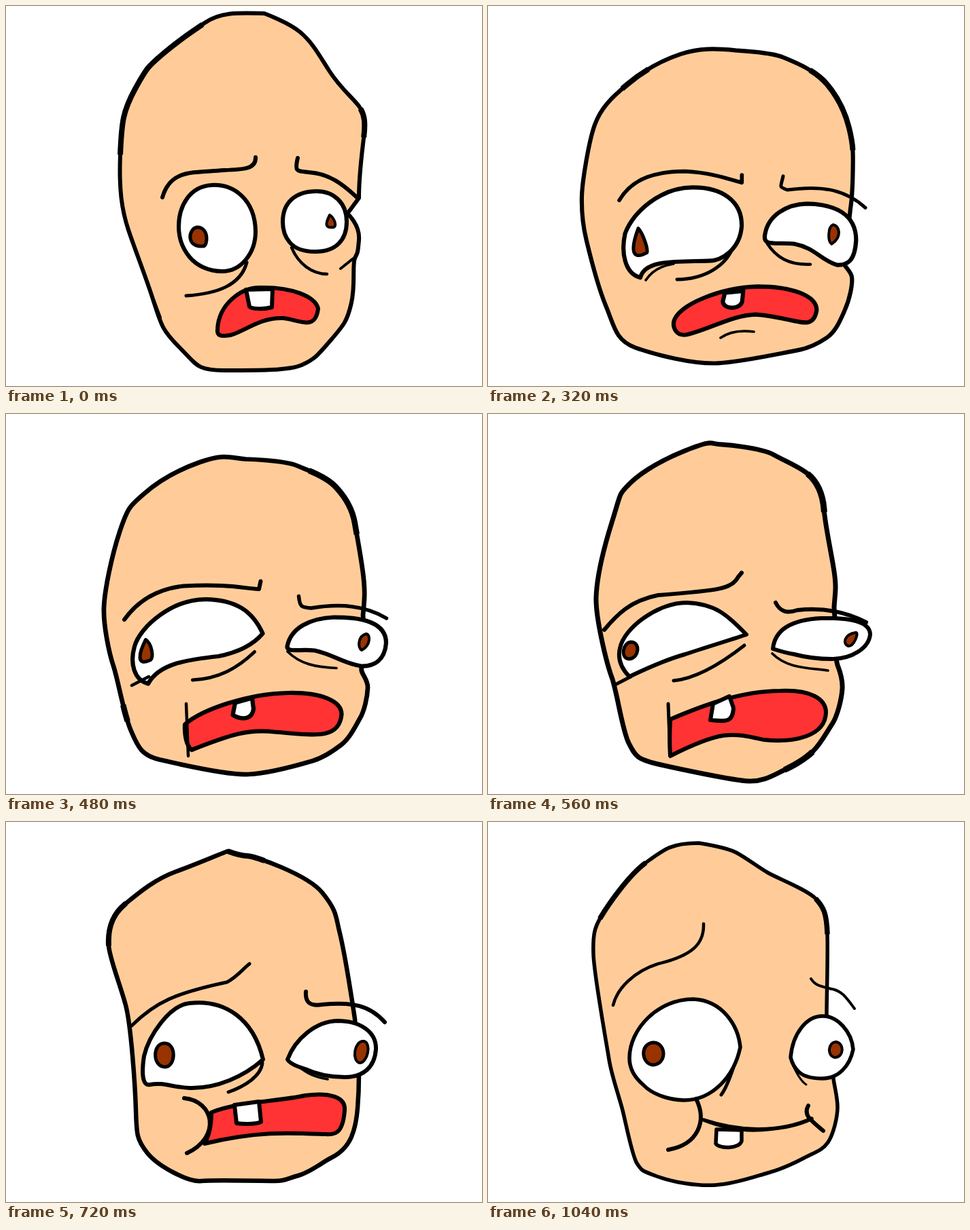
Recreate the animation shown at these times as an HTML page without scripts. Size 700x560 px, loop 1.88 s.

```html
<!DOCTYPE html>
<html lang="en">
<head>
<meta charset="utf-8">
<title>Face</title>
<style>
html, body { margin: 0; width: 100%; height: 100%; overflow: hidden; background: #fff; }
svg { display: block; width: 100vw; height: 100vh; }
path {
  fill: none; stroke: #000; stroke-width: 6;
  stroke-linecap: round; stroke-linejoin: round;
  /* two drawings per pose, held 80 ms each */
  animation: 1.88s steps(2) infinite;
}
#head { fill: #fc9; animation-name: head; }
#weight { stroke-linecap: butt; animation-name: head, weight; }
#bagL { stroke-width: 5; animation-name: bagL; }
#bagR { stroke-width: 4.5; animation-name: bagR; }
#eyeL { fill: #fff; animation-name: line, eyeL; }
#eyeR { fill: #fff; animation-name: line, eyeR; }
#pupilL { fill: #930; stroke-width: 5; animation-name: pupilL; }
#pupilR { fill: #930; stroke-width: 4; animation-name: pupilR; }
#mouth { fill: #f33; animation-name: line, mouth; }
#tooth { fill: #fff; animation-name: line, tooth; }
#crease { animation-name: crease; }
#browL { animation-name: browL; }
#browR { animation-name: browR; }

@keyframes line {
  0% { stroke-width: 6; }
  8.51% { stroke-width: 5.5; animation-timing-function: steps(3); }
  21.276% { stroke-width: 6.5; }
  29.787% { stroke-width: 6; }
  38.297% { stroke-width: 6; }
  46.808% { stroke-width: 5; }
  55.319%, to { stroke-width: 5.5; }
}
@keyframes head {
  0% { stroke-width: 6; d: path("M380 11S415 24 432 38S458 68 475 95S513 138 520 149S529 170 526 195S519 250 519 283L502 306S521 322 519 345S517 362 513 372S514 410 508 437S497 470 478 492S455 520 435 529S360 537 320 537S280 528 255 503S228 470 217 435S190 360 180 330S166 270 168 220S172 155 190 122S210 88 235 67S268 42 292 25S345 10 380 11Z"); }
  8.51% { stroke-width: 5.5; animation-timing-function: steps(3); d: path("M372 20S412 30 430 42S478 72 495 91S522 140 529 175S531 195 526 215S521 265 517 280L505 302S503 350 507 363S514 385 519 394S514 440 504 465S490 500 478 511S445 524 425 529S385 539 355 537S285 525 243 504S214 458 200 432S172 360 166 325S156 265 156 240S160 170 165 155S195 105 215 86S262 48 292 36S340 21 372 20Z"); }
  21.276% { stroke-width: 6.5; d: path("M360 88S418 87 435 92S482 105 500 127S527 165 532 182S540 220 542 245S544 285 541 308L543 335S540 370 532 378S543 390 543 402S540 430 535 440S522 470 508 478S480 496 468 497S370 517 330 521S225 508 203 503S172 480 160 447S140 375 134 355S128 320 129 300S142 215 153 185S175 150 200 130S255 95 280 88S330 83 360 88Z"); }
  29.787% { stroke-width: 7; d: path("M345 45S400 49 420 60S458 78 470 88S492 115 494 140S505 205 509 232S510 265 509 285L512 330S511 362 514 370S522 390 521 405S514 445 506 457S490 485 478 497S450 518 435 525S405 542 383 541S280 523 250 516S217 505 207 485S190 410 182 388S158 300 159 270S168 205 182 160S192 120 205 106S245 72 290 54S325 45 345 45Z"); }
  38.297% { stroke-width: 6.5; d: path("M326 43S345 50 355 50S443 77 465 104S485 140 490 160S502 220 506 245S510 270 513 290L516 330S519 360 519 372S518 410 517 422S514 450 508 464S492 488 478 495S448 516 430 521S410 529 395 529S305 527 287 529S224 508 208 488S192 460 191 425S184 300 176 270S152 200 151 182S152 140 175 121S220 84 250 73S315 47 326 43Z"); }
  46.808% { stroke-width: 4.5; d: path("M345 41S378 51 395 62S455 100 475 115S490 130 493 148S503 185 503 205S500 260 499 283L506 330S510 370 510 385S509 420 508 435S506 465 503 472S480 488 460 496S425 510 405 516S355 531 322 531S262 527 243 518S228 512 222 495S190 410 182 375S168 300 160 262S157 205 157 185S168 150 177 132S198 85 230 68S310 42 345 41Z"); }
  55.319%, to { stroke-width: 5.5; d: path("M310 31S350 37 365 45S398 67 412 75S470 100 482 113S498 135 499 165S498 260 498 283L503 330S507 368 508 378S514 405 514 420S508 460 500 472S480 487 465 495S430 512 412 517S365 533 335 535S270 530 248 522S226 514 219 503S203 445 198 425S182 375 178 350S156 225 155 195S157 155 166 140S205 80 232 60S270 31 310 31Z"); }
}
/* heavier stretches of the outline, in percent of its length */
@keyframes weight {
  0% { stroke-width: 8; stroke-dasharray: 0 14 3 60 16.5 0 0 100; }
  8.51% { stroke-width: 8; stroke-dasharray: 0 16 3 69 10 0 0 100; animation-timing-function: steps(3); }
  21.276% { stroke-width: 8; stroke-dasharray: 0 4 13 70 0 0 0 100; }
  29.787% { stroke-width: 9; stroke-dasharray: 0 9.5 4.5 26 3.5 0 0 100; }
  38.297% { stroke-width: 8; stroke-dasharray: 0 0 4 79 5 0 0 100; }
  46.808% { stroke-width: 7.5; stroke-dasharray: 0 4 9 46 9 8 8 100; }
  55.319%, to { stroke-width: 7.5; stroke-dasharray: 0 13.5 4 69 7.5 0 0 100; }
}
@keyframes bagL {
  0% { d: path("M265 427C310 424 345 412 354 378"); }
  8.51% { animation-timing-function: steps(3); d: path("M282 427C320 428 370 385 371 350"); }
  21.276% { d: path("M276 391C320 390 340 380 354 360"); }
  29.787% { d: path("M273 393C305 390 340 370 377 341"); }
  38.297% { d: path("M327 398C350 390 375 375 377 355"); }
  46.808% { d: path("M337 403C352 390 362 370 367 345"); }
  55.319%, to { d: path("M343 402C352 390 360 365 368 340"); }
}
@keyframes bagR {
  0% { d: path("M420 356C430 380 450 395 472 395"); }
  8.51% { animation-timing-function: steps(3); d: path("M412 356C420 385 445 402 478 400"); }
  21.276% { d: path("M410 347C425 362 440 372 472 371"); }
  29.787% { d: path("M418 353C440 375 470 374 500 378"); }
  38.297% { d: path("M430 360C445 372 455 376 473 379"); }
  46.808% { stroke-width: 3; d: path("M435 345C437 370 450 388 470 388"); }
  55.319%, to { d: path("M449 360C454 370 460 382 468 387"); }
}
@keyframes eyeL {
  0% { d: path("M254 325C254 295 270 266 302 264C335 262 366 285 367 332C367 365 345 391 318 391C297 391 280 382 270 370C260 358 254 342 254 325Z"); }
  8.51% { animation-timing-function: steps(3); d: path("M237 325C250 295 275 267 312 266C348 266 372 290 369 330C366 372 325 407 300 407C280 407 262 398 252 385C243 365 238 345 237 325Z"); }
  21.276% { d: path("M184 340C195 310 240 268 295 268C340 267 375 285 375 322C373 350 355 360 335 360C270 362 215 362 210 408C180 409 174 372 184 340Z"); }
  29.787% { d: path("M194 345C200 315 250 278 292 278C335 280 350 295 380 325C350 335 320 344 290 354C262 362 235 374 208 387C196 375 190 362 194 345Z"); }
  38.297% { d: path("M203 345C210 315 240 270 270 267C322 261 364 290 378 350C350 375 310 393 270 392C245 391 230 383 212 387C199 390 200 365 203 345Z"); }
  46.808% { d: path("M201 362C212 325 250 258 318 258C338 258 365 305 369 330C364 375 315 408 265 408C243 408 226 400 217 391C205 378 201 372 201 362Z"); }
  55.319%, to { d: path("M208 348C208 305 250 261 302 261C345 263 368 300 371 332C362 375 330 410 288 410C262 409 240 400 228 387C214 375 208 362 208 348Z"); }
}
@keyframes eyeR {
  0% { d: path("M407 318C407 290 425 273 457 273C482 273 501 290 501 318C501 345 485 362 455 362C437 362 425 358 417 348C410 340 407 330 407 318Z"); }
  8.51% { animation-timing-function: steps(3); d: path("M407 325C407 298 425 278 457 278C490 278 512 300 512 335C511 365 490 381 462 381C448 380 450 368 438 366C420 362 407 358 407 325Z"); }
  21.276% { d: path("M408 340C415 315 445 299 475 298C520 299 556 310 556 350C554 380 549 383 540 382C515 375 495 350 458 343C425 340 400 355 408 340Z"); }
  29.787% { d: path("M419 346C422 315 450 303 490 301C530 300 562 305 562 325C560 345 535 361 505 361C480 361 465 358 450 354C438 352 428 349 419 346Z"); }
  38.297% { d: path("M414 350C425 320 455 294 487 293C522 293 545 310 544 335C542 362 525 376 498 376C475 376 455 371 440 364C427 360 417 356 414 350Z"); }
  46.808% { d: path("M438 342C445 310 470 285 498 285C520 285 535 305 535 332C535 365 515 384 490 384C472 384 460 378 451 368C443 360 440 350 438 342Z"); }
  55.319%, to { d: path("M445 347C448 312 468 286 492 286C515 286 535 310 537 335C532 360 515 378 492 378C475 378 465 375 458 369C450 362 447 355 445 347Z"); }
}
@keyframes pupilL {
  0% { d: path("M281 326C299 326 297 354 290 354C264 356 268 328 281 326Z"); }
  8.51% { animation-timing-function: steps(3); d: path("M261 325C275 323 282 360 267 363C250 363 248 325 261 325Z"); }
  21.276% { d: path("M201 329C204 341 213 357 217 364C186 385 194 365 201 329Z"); }
  29.787% { d: path("M210 336C225 336 222 360 208 361C194 361 198 337 210 336Z"); }
  38.297% { d: path("M233 326C251 326 250 360 234 361C215 361 215 326 233 326Z"); }
  46.808% { d: path("M242 323C262 323 260 356 240 356C222 356 223 324 242 323Z"); }
  55.319%, to { d: path("M244 325C262 326 264 357 242 358C224 355 224 325 244 325Z"); }
}
@keyframes pupilR {
  0% { d: path("M476 308C480 310 488 322 482 326C468 328 470 320 476 308Z"); }
  8.51% { animation-timing-function: steps(3); d: path("M486 315C496 316 494 343 484 344C474 342 475 315 486 315Z"); }
  21.276% { d: path("M518 326C526 326 536 338 516 354C512 350 512 330 518 326Z"); }
  29.787% { d: path("M541 322C546 322 538 343 530 342C522 340 522 325 541 322Z"); }
  38.297% { d: path("M526 323C538 325 532 355 520 355C508 352 512 322 526 323Z"); }
  46.808% { d: path("M515 327C527 329 525 345 518 346C508 346 502 334 515 327Z"); }
  55.319%, to { d: path("M512 324C524 326 524 347 510 347C498 345 500 324 512 324Z"); }
}
@keyframes mouth {
  0% { d: path("M311 476C313 440 345 414 375 415C420 414 455 428 459 446C455 480 430 462 408 460C375 458 350 480 330 485C314 488 310 485 311 476Z"); }
  8.51% { animation-timing-function: steps(3); d: path("M303 467C308 440 345 413 390 412C440 412 470 430 470 455C466 475 445 455 412 450C370 450 345 470 322 481C306 485 300 476 303 467Z"); }
  21.276% { d: path("M258 465C265 440 340 416 400 414C450 414 490 425 490 445C484 485 460 462 385 457C355 458 320 478 278 486C263 488 258 475 258 465Z"); }
  29.787% { d: path("M268 450C310 432 370 408 430 408C475 406 497 420 497 440C496 475 450 485 405 480C360 470 345 465 268 504C267 490 267 470 268 450Z"); }
  38.297% { d: path("M302 428C340 412 400 412 440 403C475 398 500 405 498 425C495 465 480 460 465 460C420 458 370 455 292 474C300 460 302 445 302 428Z"); }
  46.808% { d: path("M306 436C330 439 360 446 385 447C425 443 455 432 484 420C485 426 485 430 484 433C420 465 380 468 307 452C306 447 306 440 306 436Z"); }
  55.319%, to { d: path("M317 439C340 448 365 454 390 454C425 453 455 448 476 437C476 437 476 437 476 437C425 460 365 455 317 439C317 439 317 439 317 439Z"); }
}
@keyframes tooth {
  0% { d: path("M353 418L392 417L391 444C380 447 362 447 358 443Z"); }
  8.51% { animation-timing-function: steps(3); d: path("M359 420L388 418L387 434C384 446 360 446 356 434Z"); }
  21.276% { d: path("M343 424L369 421L367 437C362 450 338 447 340 436Z"); }
  29.787% { d: path("M331 427L355 416L361 433C360 455 350 453 327 451Z"); }
  38.297% { d: path("M336 417L372 412L375 442C365 446 348 445 339 444Z"); }
  46.808% { d: path("M336 447L372 447L370 470C365 476 345 476 334 468Z"); }
  55.319%, to { d: path("M336 453L373 454L373 470C370 482 340 482 335 474Z"); }
}
@keyframes crease {
  0% { stroke-width: 4; d: path("M512 371L492 387M218 435L227 459"); }
  8.51% { stroke-width: 3; animation-timing-function: steps(3); d: path("M427 369Q435 370 439 376M154 235Q152 290 162 318M240 501L247 508"); }
  21.276% { stroke-width: 4; d: path("M342 489Q360 476 391 480M232 404Q245 384 273 380"); }
  29.787% { stroke-width: 5; d: path("M185 400L210 387M265 427L268 504"); }
  38.297% { stroke-width: 6; d: path("M262 407C306 411 317 464 266 488"); }
  46.808% { stroke-width: 6; d: path("M293 408C325 450 290 504 249 477M482 415L487 441"); }
  55.319%, to { stroke-width: 6; d: path("M306 408C322 440 310 475 265 483M471 418C463 432 475 440 493 455"); }
}
@keyframes browL {
  0% { stroke-width: 6; d: path("M230 282C242 240 275 246 320 242C350 241 368 240 367 223L367 223"); }
  8.51% { stroke-width: 5; animation-timing-function: steps(3); d: path("M225 283C240 252 270 251 325 251C355 257 372 250 368 229L368 229"); }
  21.276% { stroke-width: 6; d: path("M177 288C200 252 240 240 272 240C315 240 340 256 376 276L376 259"); }
  29.787% { stroke-width: 6; d: path("M171 318C190 295 210 275 250 267C340 260 358 258 368 240L373 234"); }
  38.297% { stroke-width: 5; d: path("M185 300C220 265 250 252 325 236C340 228 350 215 358 209L358 209"); }
  46.808% { stroke-width: 4; d: path("M190 283C200 262 240 230 265 219C310 203 338 185 326 161L326 161"); }
  55.319%, to { stroke-width: 4.5; d: path("M184 270C190 245 215 220 250 209C300 197 318 180 317 150L317 150"); }
}
@keyframes browR {
  0% { stroke-width: 6; d: path("M429 224C424 245 428 243 445 245C475 247 495 262 517 283"); }
  8.51% { stroke-width: 5; animation-timing-function: steps(3); d: path("M426 234C424 250 424 246 434 247C490 248 520 265 539 302"); }
  21.276% { stroke-width: 5; d: path("M438 259C434 276 428 276 443 283C485 273 525 270 563 295"); }
  29.787% { stroke-width: 6; d: path("M423 278C430 292 440 294 455 289C500 284 535 296 556 307"); }
  38.297% { stroke-width: 6; d: path("M441 250C440 265 446 272 465 269C510 265 535 270 557 295"); }
  46.808% { stroke-width: 3.5; d: path("M470 234C464 244 470 246 482 248C505 250 520 262 533 286"); }
  55.319%, to { stroke-width: 4; d: path("M475 231C482 242 490 242 505 246C520 248 528 260 539 275"); }
}
</style>
</head>
<body>
<svg viewBox="0 0 700 560">
  <path id="head"/>
  <path id="weight" pathLength="100"/>
  <path id="bagL"/>
  <path id="bagR"/>
  <path id="eyeL"/>
  <path id="eyeR"/>
  <path id="pupilL"/>
  <path id="pupilR"/>
  <path id="mouth"/>
  <path id="tooth"/>
  <path id="crease"/>
  <path id="browL"/>
  <path id="browR"/>
</svg>
</body>
</html>
```
